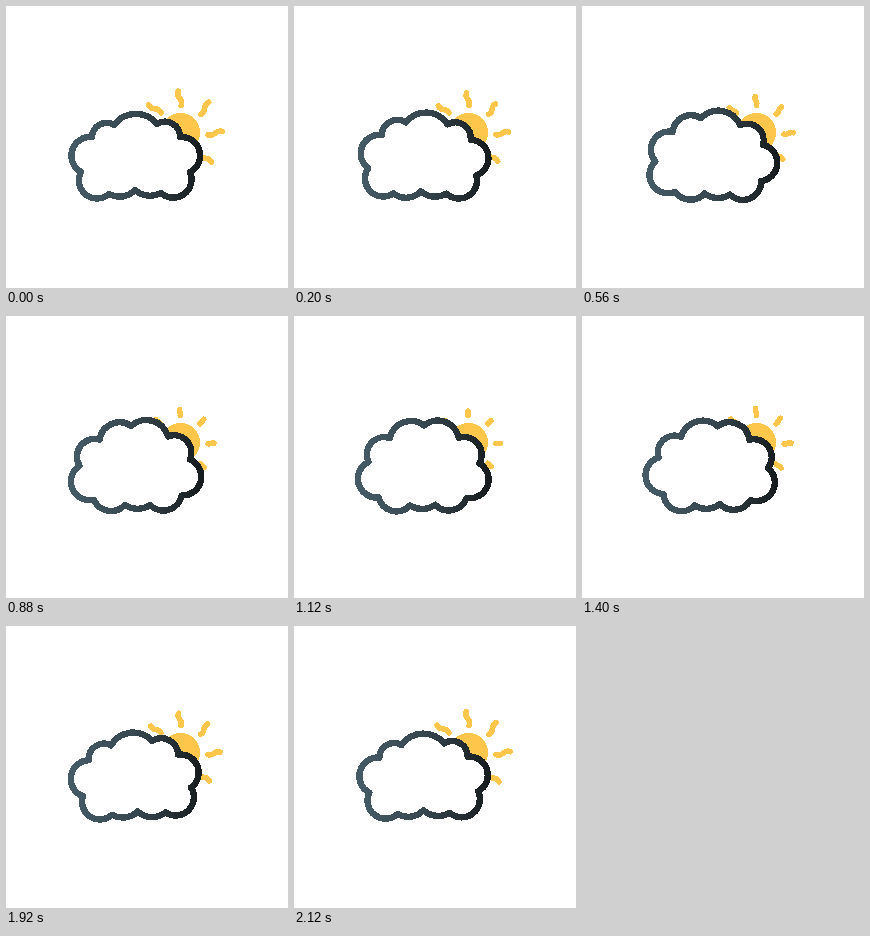
An HTML page for the animation above (2160 ms loop, 282 by 282 pixels).

```html
<!DOCTYPE html>
<html lang="en">
<head>
<meta charset="utf-8">
<title>Cloud and sun</title>
<style>
  html, body { margin: 0; width: 100%; height: 100%; overflow: hidden; background: #fff; }
  svg { display: block; width: 100vw; height: 100vh; shape-rendering: crispEdges; }
</style>
</head>
<body>
<svg viewBox="0 0 282 282">
  <defs>
    <linearGradient id="ink" gradientUnits="userSpaceOnUse" x1="62" y1="0" x2="197" y2="0">
      <stop offset="0" stop-color="#455c67"/>
      <stop offset="0.5" stop-color="#37474f"/>
      <stop offset="1" stop-color="#161b1d"/>
    </linearGradient>
  </defs>
  <circle cx="174.5" cy="126.5" r="19.7" fill="#ffc64c"/>
  <path id="rays" fill="none" stroke="#ffc64c" stroke-width="5.6" stroke-linecap="round"/>
  <path id="cloud" fill="#fff" stroke="url(#ink)" stroke-width="6.4" stroke-linejoin="round"/>
</svg>
<script>
const LOOP = 2160, STEP = 40, TAU = 2 * Math.PI;

// Notches between the cloud's bumps, clockwise, at the start of the loop.
const notches = [
  [86, 131], [108, 119], [151, 118], [174, 131], [184, 166],
  [155, 187], [129, 184], [103, 188], [75, 166]
];
const sun = [174, 127.5];

const cloudPath = document.getElementById("cloud");
const raysPath = document.getElementById("rays");
const point = p => p.map(v => v.toFixed(2)).join(" ");
const wrap = (list, i) => list[(i + list.length) % list.length];
const sub = (a, b) => [a[0] - b[0], a[1] - b[1]];

// Over one loop every notch arcs over to the place of the next one.
function moveNotch(from, i, progress) {
  const [dx, dy] = sub(wrap(notches, i + 1), from);
  const lift = Math.sin(Math.PI * progress) * Math.hypot(dx, dy) / 205;
  return [from[0] + dx * progress + dy * lift, from[1] + dy * progress - dx * lift];
}

// Bumps swell more where the outline turns more sharply.
function cloudShape(progress) {
  const points = notches.map((p, i) => moveNotch(p, i, progress));
  const chords = points.map((p, i) => sub(wrap(points, i + 1), p));
  const angles = chords.map(([dx, dy]) => Math.atan2(dy, dx));
  const arcs = chords.map((chord, i) => {
    const turn = (wrap(angles, i + 1) - wrap(angles, i - 1) + 2 * TAU) % TAU;
    const bulge = 0.16 + 0.33 * turn;
    const radius = (Math.hypot(...chord) * (1 + bulge * bulge) / (4 * bulge)).toFixed(2);
    return `A${radius} ${radius} 0 0 1 ${point(wrap(points, i + 1))}`;
  });
  return `M${point(points[0])}${arcs.join("")}Z`;
}

function polar(angle, radius) {
  return [sun[0] + radius * Math.cos(angle), sun[1] + radius * Math.sin(angle)];
}

// Rays lengthen, twist and ripple together.
function rayShape(index, stretch) {
  const angle = (index - 3) * TAU / 8;
  const twist = 0.045 * stretch;
  const base = polar(angle + twist, 28);
  const tip = polar(angle - twist, 32 + 10.5 * stretch);
  const [dx, dy] = sub(tip, base);
  const wave = 4.5 * stretch / Math.hypot(dx, dy);
  const control = (along, side) =>
    point([base[0] + dx * along - dy * wave * side, base[1] + dy * along + dx * wave * side]);
  return `M${point(base)}C${control(0.45, 1)} ${control(0.55, -1)} ${point(tip)}`;
}

function draw(elapsed) {
  const progress = Math.floor(elapsed % LOOP / STEP) * STEP / LOOP;
  const stretch = Math.abs(1 - 2 * progress);
  cloudPath.setAttribute("d", cloudShape(progress));
  raysPath.setAttribute("d", Array.from({ length: 5 }, (_, i) => rayShape(i, stretch)).join(""));
}

const start = performance.now();
function tick() {
  draw(performance.now() - start);
  requestAnimationFrame(tick);
}
tick();
</script>
</body>
</html>
```
